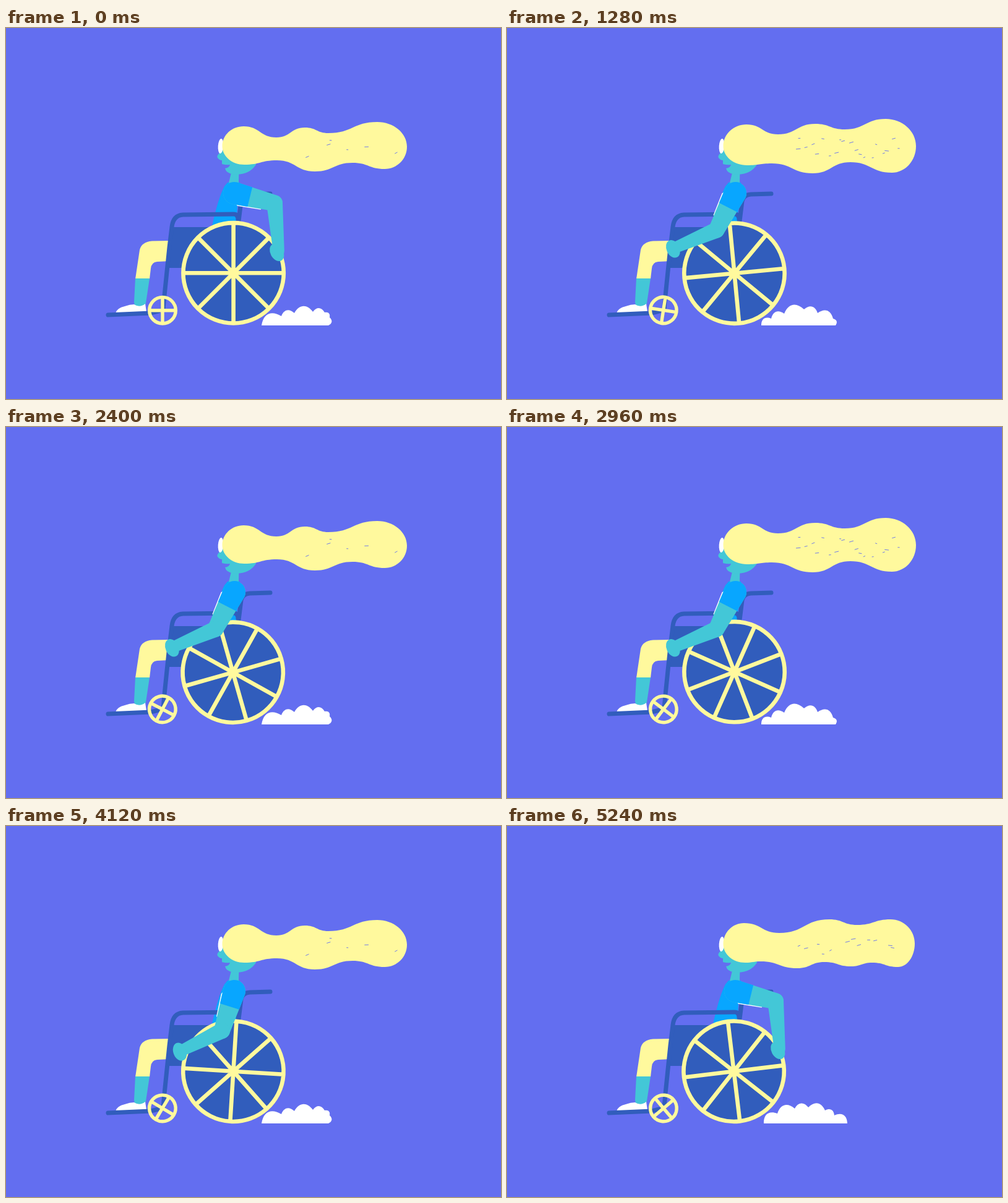
These frames come from a looping animation (800 px wide and 600 px high, 5280 ms). An HTML page with a canvas:

```html
<!DOCTYPE html>
<html lang="en">
<head>
<meta charset="utf-8">
<title>Wheelchair ride</title>
<style>
html, body { margin: 0; width: 100%; height: 100%; overflow: hidden; background: #636ef0; }
canvas { display: block; }
</style>
</head>
<body>
<canvas id="stage" width="800" height="600"></canvas>
<script>
const ctx = document.getElementById('stage').getContext('2d');
const BG = '#636ef0', YELLOW = '#fff99d', TEAL = '#43c7d7';
const BLUE = '#08a6ff', NAVY = '#315dbc', WHITE = '#ffffff';
const STEP = 40, STEPS = 132, RAD = Math.PI / 180;

// Three drawings, each held for two steps.
// Hair: crests and dips of the upper edge, the tip, then the lower edge.
// Dust: the notches between its puffs.
const DRAWINGS = [
  {
    top: [384, 159, 437, 177, 483, 161, 521, 170, 600, 152],
    tip: [648, 192],
    low: [612, 228, 560, 218, 499, 232, 438, 214, 385, 221],
    dust: [413, 481, 445, 466, 466, 461, 496, 459, 515, 460, 523, 468, 521, 481],
    flecks: 6
  },
  {
    top: [387, 156, 438, 172, 498, 155, 546, 164, 612, 147],
    tip: [661, 191],
    low: [622, 234, 555, 217, 494, 235, 428, 219, 388, 222],
    dust: [411, 481, 427, 470, 448, 462, 480, 455, 502, 461, 527, 470, 531, 481],
    flecks: 20
  },
  {
    top: [383, 157, 440, 173, 521, 151, 566, 160, 620, 151],
    tip: [659, 190],
    low: [632, 228, 590, 221, 556, 227, 513, 220, 469, 230, 410, 219, 385, 221],
    dust: [415, 481, 437, 465, 465, 457, 487, 455, 514, 460, 529, 468, 550, 481],
    flecks: 12
  }
];

// Arm poses: upper angle, lower angle, lower length, hand angle
const ARM = [
  [14, 85, 78, 62],
  [43, 132, 70, 95],
  [117, 157, 73, 65]
];

function fill(color, d) {
  ctx.fillStyle = color;
  ctx.fill(new Path2D(d));
}

function line(color, width, d) {
  ctx.strokeStyle = color;
  ctx.lineWidth = width;
  ctx.lineCap = ctx.lineJoin = 'round';
  ctx.stroke(new Path2D(d));
}

function ellipse(color, x, y, rx, ry, turn = 0) {
  ctx.fillStyle = color;
  ctx.beginPath();
  ctx.ellipse(x, y, rx, ry, turn * RAD, 0, 2 * Math.PI);
  ctx.fill();
}

// Edge that is level at every listed point
function wave(p) {
  for (let i = 2; i < p.length; i += 2) {
    const mx = (p[i - 2] + p[i]) / 2;
    ctx.bezierCurveTo(mx, p[i - 1], mx, p[i + 1], p[i], p[i + 1]);
  }
}

// Quarter of an ellipse, leaving level or upright
function quarter(x1, y1, x2, y2, level) {
  const k = 0.5523, dx = (x2 - x1) * k, dy = (y2 - y1) * k;
  if (level) ctx.bezierCurveTo(x1 + dx, y1, x2, y2 - dy, x2, y2);
  else ctx.bezierCurveTo(x1, y1 + dy, x2 - dx, y2, x2, y2);
}

function drawHair({ top, tip, low, flecks }) {
  const front = [349.5, 191];
  ctx.beginPath();
  ctx.moveTo(...front);
  quarter(...front, top[0], top[1], false);
  wave(top);
  quarter(...top.slice(-2), ...tip, true);
  quarter(...tip, low[0], low[1], false);
  wave(low);
  quarter(...low.slice(-2), ...front, true);
  ctx.fillStyle = YELLOW;
  ctx.fill();

  let seed = flecks;
  const rnd = () => (seed = (seed * 16807 + 11) % 2147483647) / 2147483647;
  rnd();
  for (let i = 0; i < flecks; i++) {
    const x = 462 + (i + rnd()) * 172 / flecks, y = 178 + 32 * rnd();
    line(BG, 0.9, `M${x} ${y}l${2 + 5 * rnd()} ${3 * rnd() - 2}`);
  }
}

function drawDust(p) {
  ctx.beginPath();
  ctx.moveTo(p[0], p[1]);
  for (let i = 2; i < p.length; i += 2) {
    const [x1, y1, x2, y2] = p.slice(i - 2, i + 2);
    const dx = (x2 - x1) / 2, dy = (y2 - y1) / 2;
    const bx = dy * 0.9, by = -dx * 0.9;
    ctx.bezierCurveTo(x1 + dx * 0.6 + bx, y1 + dy * 0.6 + by,
      x2 - dx * 0.6 + bx, y2 - dy * 0.6 + by, x2, y2);
  }
  ctx.closePath();
  ctx.fillStyle = WHITE;
  ctx.fill();
}

// Limb between two circles of different radius
function limb(color, x1, y1, r1, x2, y2, r2) {
  const dir = Math.atan2(y2 - y1, x2 - x1);
  const side = Math.acos((r1 - r2) / Math.hypot(x2 - x1, y2 - y1));
  ctx.beginPath();
  ctx.arc(x1, y1, r1, dir + side, dir - side + 2 * Math.PI);
  ctx.arc(x2, y2, r2, dir - side, dir + side);
  ctx.closePath();
  ctx.fillStyle = color;
  ctx.fill();
}

function wheel(x, y, r, width, spokes, angle, inner, wobble) {
  ctx.save();
  ctx.translate(x, y);
  ctx.rotate(-angle * RAD);
  ctx.translate(wobble, 0);
  if (inner) ellipse(inner, 0, 0, r, r);
  ctx.strokeStyle = YELLOW;
  ctx.lineWidth = width;
  ctx.lineCap = 'butt';
  ctx.beginPath();
  ctx.arc(0, 0, r, 0, 2 * Math.PI);
  for (let i = 0; i < spokes; i++) {
    const a = i * 2 * Math.PI / spokes;
    ctx.moveTo(0, 0);
    ctx.lineTo(r * Math.cos(a), r * Math.sin(a));
  }
  ctx.stroke();
  ctx.restore();
}

const ease = (f, from, to) => {
  const k = Math.max(0, Math.min(1, (f - from) / (to - from)));
  return k * k * (3 - 2 * k);
};

function armPose(f) {
  const u = 2 * (ease(f, 4, 22) - ease(f, 98, 130));
  const i = Math.min(1, Math.floor(u));
  return ARM[i].map((v, k) => v + (ARM[i + 1][k] - v) * (u - i));
}

function drawArm(f) {
  const [upper, lower, reach, turn] = armPose(f);
  const sx = 369, sy = 267;
  const ex = sx + 67 * Math.cos(upper * RAD), ey = sy + 67 * Math.sin(upper * RAD);
  const wx = ex + reach * Math.cos(lower * RAD), wy = ey + reach * Math.sin(lower * RAD);

  ctx.save();
  ctx.translate(sx, sy);
  ctx.rotate(upper * RAD);
  fill(WHITE, 'M4 15L10 19L48 15.5L48 10Z');
  ctx.restore();

  limb(TEAL, sx, sy, 18, ex, ey, 13);
  limb(TEAL, ex, ey, 13, wx, wy, 9);
  ellipse(TEAL, wx - 3, wy + 2, 15, 10.5, turn);

  // Sleeve
  ctx.save();
  ctx.translate(sx, sy);
  ctx.rotate(upper * RAD);
  fill(BLUE, 'M0 -18A18 18 0 0 0 0 18L26 16.2L26 -16.2Z');
  ctx.restore();
}

function drawBody() {
  fill(YELLOW, 'M264 344L236 344.5Q219 346 216 359L209 406H232L234 389Q235 379 244 378L264 377Z');
  fill(TEAL, 'M209 405H232L226 445Q224 452 216 452Q207 451 207 443Z');
  fill(WHITE, 'M177 461Q179 453 192 450Q200 447 207 447Q216 453 225 446L227 459Z');
  line(NAVY, 7, 'M165 464L234 461L246 458');
  line(NAVY, 7, 'M427 268L394 269Q382 270 380 280L376 312');
  fill(NAVY, 'M267 322H345V388H259Z');

  fill(BLUE, 'M358 250Q368 247 378 250L380 284L374 288L372 320H333Q343 275 353 256Z');
  fill(TEAL, 'M365 230H376.5L376 250Q368 249 360 250.5Z');
  fill(TEAL, 'M349 186L345 202Q340 207 342 210Q345 214 349 214L349 220Q356 222 362 221'
    + 'Q361 226 354 227Q356 235 367 236.5Q392 239 404 221L400 190Z');
  ellipse(WHITE, 347, 191, 4.3, 12, 4);
}

function drawFrame() {
  line(NAVY, 7, 'M254 455L256 433L264 355L268 322Q270 303 286 302L368 301Q375 301 375 310');
}

function draw(f) {
  const drawing = DRAWINGS[Math.floor(f / 2) % 3];
  ctx.fillStyle = BG;
  ctx.fillRect(0, 0, 800, 600);

  drawDust(drawing.dust);
  drawBody();
  drawHair(drawing);
  drawFrame();
  wheel(367, 396.3, 81.2, 6.6, 8, 10.014 * f, NAVY, 0.6);
  wheel(252.7, 456.7, 21.3, 5.4, 4, 25.04 * f, null, 0.3);
  drawArm(f);
}

function tick(now) {
  draw(Math.floor(now / STEP) % STEPS);
  requestAnimationFrame(tick);
}
draw(0);
requestAnimationFrame(tick);
</script>
</body>
</html>
```
